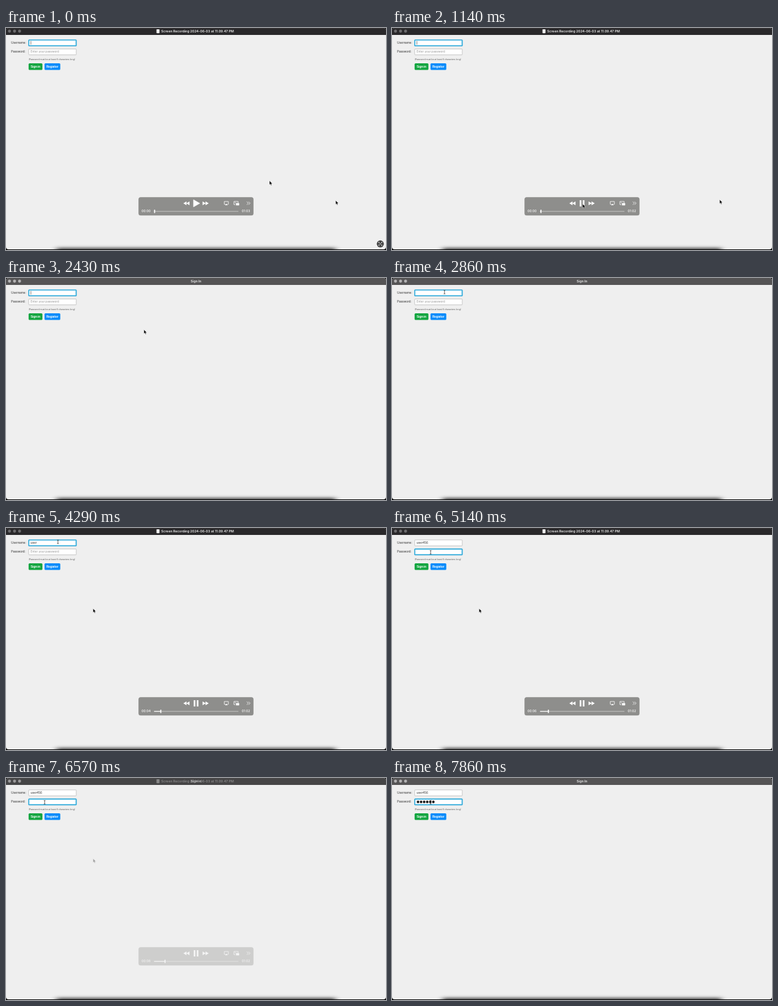
An HTML page that plays this animation: 600x352 px, repeating every 8 s.

```html
<!DOCTYPE html>
<html lang="en">
<head>
<meta charset="utf-8">
<title>Sign In</title>
<style>
  html, body { margin: 0; width: 100%; height: 100%; overflow: hidden; background: #000; }
  svg { display: block; width: 100%; height: 100%; }
  text { font: 4.8px Inter, sans-serif; letter-spacing: -.1px; fill: #333; white-space: pre; }
  .title { font-size: 5.2px; font-weight: 600; letter-spacing: 0; fill: #eee; }
  .hint { font-size: 3.6px; fill: #666; }
  .prompt { fill: #999; }
  .button { font-size: 4.6px; font-weight: 700; letter-spacing: -.02px; fill: #fff; }
  .clock { font-size: 5px; font-weight: 500; letter-spacing: -.05px; fill: #fff; }
  .field rect { fill: #fff; stroke: #bdbdbd; stroke-width: .8; }
  .focus rect { stroke: #22a5d8; stroke-width: 1.5; }
  .focus .glow { fill: none; stroke: #8fd3ee; stroke-width: .6; }
  .glow { display: none; }
  .focus .glow { display: inline; }
</style>
</head>
<body>
<svg viewBox="0 0 600 352">
  <defs>
    <filter id="blur" x="-10%" y="-400%" width="120%" height="900%"><feGaussianBlur stdDeviation="5 2.4"/></filter>
    <clipPath id="window"><rect width="600" height="351" rx="4"/></clipPath>
    <path id="skip" d="M0 0l5 3-5 3zM4.7 0l5 3-5 3z"/>
    <path id="arrow" d="M0 0v6.3l1.4-1.3 1 2.3 1.1-.5-1-2.2h2z" fill="#000" stroke="#fff" stroke-width=".4"/>
    <g id="lights">
      <circle cx="5.5" cy="5" r="2.4"/><circle cx="13.5" cy="5" r="2.4"/><circle cx="21.4" cy="5" r="2.4"/>
    </g>
  </defs>

  <rect width="600" height="352"/>
  <g clip-path="url(#window)">
    <rect width="600" height="352" fill="#efefef"/>
    <rect x="80" y="349" width="440" height="7" fill="#333" filter="url(#blur)"/>
    <rect width="600" height="11" fill="#555455"/>
    <use href="#lights" fill="#b2b1b2"/>
    <text class="title" x="300" y="6.6" text-anchor="middle">Sign In</text>

    <text x="8" y="25">Username:</text>
    <text x="8" y="39.4">Password:</text>
    <g id="username" class="field">
      <rect x="35.9" y="18.9" width="75" height="9.4" rx=".8"/>
      <rect class="glow" x="36.9" y="19.9" width="73" height="7.4"/>
      <text id="name" x="38.8" y="25"></text>
      <path id="caret" d="M39.3 20.6v5.8" stroke="#333" stroke-width=".6"/>
    </g>
    <g id="password" class="field">
      <rect x="35.9" y="33.2" width="75" height="9.4" rx=".8"/>
      <rect class="glow" x="36.9" y="34.2" width="73" height="7.4"/>
      <text id="prompt" class="prompt" x="38.8" y="39.4">Enter your password</text>
      <g id="dots" fill="#222"></g>
    </g>
    <text class="hint" x="35.5" y="50.8">(Password must be at least 6 characters long)</text>
    <rect x="35.7" y="56" width="21.8" height="10.5" rx="1.6" fill="#12a53f"/>
    <text class="button" x="46.6" y="62.9" text-anchor="middle">Sign in</text>
    <rect x="60.8" y="56" width="24.9" height="10.5" rx="1.6" fill="#078bfa"/>
    <text class="button" x="73.3" y="62.9" text-anchor="middle">Register</text>

    <g id="corner">
      <circle cx="591" cy="342.3" r="5.5" fill="#3b3b3b"/>
      <path d="M588.3 339.6l5.4 5.4m0-5.4l-5.4 5.4M588.2 341.4v-1.9h1.9m1.8 0h1.9v1.9m0 1.8v1.9h-1.9m-1.8 0h-1.9v-1.9" fill="none" stroke="#ddd" stroke-width=".7"/>
    </g>
    <use id="pointer" href="#arrow"/>
    <path id="beam" d="M-1.3-3q1.3 0 1.3 1 0-1 1.3-1M0-2v4M-1.3 3q1.3 0 1.3-1 0 1 1.3 1" fill="none" stroke="#222" stroke-width=".7"/>

    <g id="player">
      <rect width="600" height="11" fill="#29282a"/>
      <path d="M0 .3h600" stroke="#4a494b" stroke-width=".5"/>
      <use href="#lights" fill="#6c6b6d"/>
      <rect x="237.6" y="2" width="4.8" height="6.2" rx=".7" fill="#eee"/>
      <text class="title" x="245" y="6.7">Screen Recording 2024-06-03 at 11.09.47 PM</text>

      <rect x="209.2" y="268.2" width="181.6" height="29" rx="3.5" fill="#8e8e8c"/>
      <g fill="#fff">
        <use href="#skip" transform="translate(289.7 274.9) scale(-1 1)"/>
        <use href="#skip" x="310.4" y="274.9"/>
        <path id="play" d="M296 272.3l10 5.7-10 5.7z" stroke="#fff" stroke-width=".6" stroke-linejoin="round"/>
        <path id="pause" d="M296.4 273h2.6v10h-2.6zM301.2 273h2.6v10h-2.6z"/>
        <path d="M345.6 281l2.3-2.6 2.3 2.6z"/>
        <rect x="363.2" y="277.6" width="5" height="3.6" rx=".5"/>
      </g>
      <g fill="none" stroke="#fff" stroke-width=".8">
        <path d="M346 279.4h-1.3v-4.3h6.4v4.3h-1.3"/>
        <path d="M362.3 280h-2.4v-5h6.6v1.8M361.2 276.3l1.8 1.6"/>
        <path d="M380.2 275.4l2.4 2.4-2.4 2.4M383 275.4l2.4 2.4-2.4 2.4"/>
      </g>
      <text id="elapsed" class="clock" x="214" y="292.4"></text>
      <text id="length" class="clock" x="372.3" y="292.4"></text>
      <path d="M233.8 290.7H367" stroke="#c3c3c2" stroke-width="1.1"/>
      <path id="played" stroke="#fff" stroke-width="1.1"/>
      <rect id="knob" y="288" width="1.7" height="5.4" rx=".7" fill="#fff"/>
      <use id="viewer" href="#arrow"/>
    </g>
  </g>
</svg>

<script>
const LOOP = 8000, FPS = 7, PLAY_AT = 930, FOCUS_PASSWORD = 5130;
const $ = id => document.getElementById(id);
const show = (id, on) => $(id).style.display = on ? 'inline' : 'none';
const clamp = v => Math.max(0, Math.min(1, v));
const ramp = (t, from, to) => clamp((t - from) / (to - from));

// Keys are [time, x, y]
const viewerPath = [[280, 416, 242.3], [860, 301, 279], [1280, 301, 279], [1850, 260, 233.5],
                    [2990, 260, 233.5], [3500, 137.5, 127.8]];
const pointerPath = [[PLAY_AT, 520.5, 273.5], [1500, 512, 270], [2000, 469.3, 249], [2430, 217, 81.5],
                     [2860, 82, 22], [4850, 82, 22], [5130, 61, 38.5]];

function along(path, t) {
  let i = 0;
  while (i < path.length - 2 && t > path[i + 1][0]) i++;
  const [a, b] = [path[i], path[i + 1]];
  const k = ramp(t, a[0], b[0]);
  return [a[1] + (b[1] - a[1]) * k, a[2] + (b[2] - a[2]) * k];
}

function place(id, point) {
  $(id).setAttribute('transform', `translate(${point})`);
}

function playerOpacity(t) {
  if (t < 2900) return 1 - ramp(t, 2040, 2340);
  if (t < 6000) return ramp(t, 2900, 3200);
  return 1 - ramp(t, 6370, 6672);
}

$('dots').innerHTML = Array.from({ length: 6 }, (_, i) =>
  `<circle cx="${41.1 + i * 4.84}" cy="37.9" r="2.05"/>`).join('');

function draw(t) {
  const video = Math.max(0, t - PLAY_AT) / 1000 * 1.43;
  const playing = t >= PLAY_AT;
  const onPassword = t >= FOCUS_PASSWORD;

  $('player').style.opacity = playerOpacity(t);
  show('play', !playing);
  show('pause', playing);
  show('corner', !playing);
  $('elapsed').textContent = '00:0' + Math.floor(video);
  $('length').textContent = playing ? '01:02' : '01:03';
  const x = 234.6 + video * 2.05;
  $('played').setAttribute('d', `M233.8 290.7H${x}`);
  $('knob').setAttribute('x', x - .85);

  const typed = Math.max(0, Math.min(7, Math.floor((t - 3710) / 142)));
  $('name').textContent = 'user456'.slice(0, typed);
  show('caret', !typed && video % 1 < .5);
  $('username').classList.toggle('focus', !onPassword);
  $('password').classList.toggle('focus', onPassword);
  show('prompt', !onPassword);
  const hidden = Math.ceil((t - 7200) / 110);
  [...$('dots').children].forEach((dot, i) => dot.style.display = i < hidden ? 'inline' : 'none');

  const overField = t >= 2850;
  const point = along(pointerPath, t);
  place('pointer', point);
  place('beam', point);
  show('pointer', !overField);
  show('beam', overField);
  place('viewer', along(viewerPath, t));
}

function tick(now) {
  const step = Math.floor((now % LOOP) * FPS / 1000 + .04);
  draw(step * 1000 / FPS);
  requestAnimationFrame(tick);
}
draw(0);
requestAnimationFrame(tick);
</script>
</body>
</html>
```
